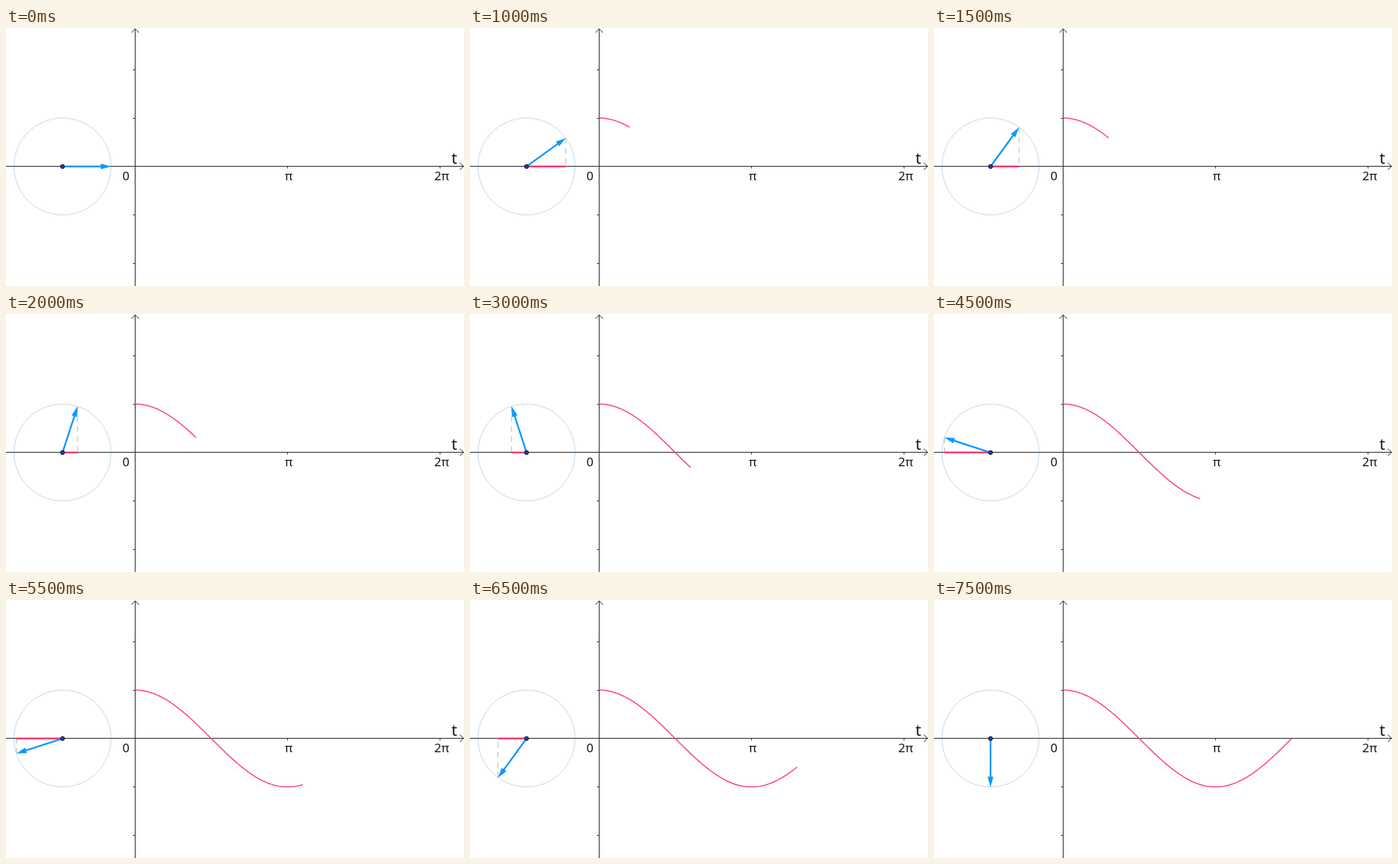
An HTML page for the animation above (8 s loop, 640x361 px).

```html
<!DOCTYPE html>
<html lang="en">
<head>
<meta charset="utf-8">
<title>Cosine from a rotating vector</title>
<style>
  html, body { margin: 0; width: 100%; height: 100%; overflow: hidden; background: #fff; }
  svg { display: block; width: 640px; height: 361px; }
  path, line, circle { fill: none; }
  text { font: 17px "Noto Sans", "Open Sans", sans-serif; fill: #111; }
  .axis { stroke: #222; stroke-width: 1; }
</style>
</head>
<body>
<svg viewBox="0 0 640 361">
  <circle cx="79" cy="193.8" r="67.8" stroke="#bfd9ec"/>
  <path class="axis" d="M0 193.5H639M634 188.5L639.5 193.5L634 198.5
    M180.5 361V1.5M175.5 6.5L180.5 1L185.5 6.5"/>
  <path class="axis" id="ticks"/>
  <text x="162.7" y="213">0</text>
  <text x="389.5" y="213">π</text>
  <text x="598.5" y="213">2π</text>
  <text x="622.5" y="190" style="font-size:22px">t</text>
  <path id="curve" stroke="#ff4070" stroke-width="1.5"/>
  <path id="drop" stroke="#b5b5b5" stroke-dasharray="8 6"/>
  <path id="shadow" stroke="#f5386b" stroke-width="2.4"/>
  <g id="vector">
    <path d="M0 0H56" stroke="#0d99ff" stroke-width="2.4"/>
    <path d="M67.8 0L53.5 -4V4Z" style="fill:#0d99ff"/>
  </g>
  <circle cx="79" cy="193.8" r="2.8" stroke="#0a1030" style="fill:#1c3fc4"/>
</svg>
<script>
  const UNIT = 67.8, CENTER = 79, ORIGIN = 180.3, AXIS = 193.8;
  const STEP_MS = 500, STEPS = 16;
  const $ = id => document.getElementById(id);
  const setPath = (id, d) => $(id).setAttribute("d", d);

  const verticalTicks = [-2, -1, 1, 2]
    .map(n => `M177.5 ${Math.floor(AXIS + n * UNIT) + 0.5}H180.5`);
  const horizontalTicks = [1, 2]
    .map(n => `M${Math.floor(ORIGIN + n * Math.PI * UNIT) + 0.5} 193.5V196.5`);
  setPath("ticks", verticalTicks.concat(horizontalTicks).join(""));

  function cosinePath(end) {
    const points = [];
    const count = Math.ceil(end * 40);
    for (let i = 0; i <= count; i++) {
      const t = end * i / count;
      points.push(`${(ORIGIN + t * UNIT).toFixed(2)} ${(AXIS - Math.cos(t) * UNIT).toFixed(2)}`);
    }
    return "M" + points.join("L");
  }

  function draw(step) {
    const angle = step * Math.PI / 10;
    const x = CENTER + Math.cos(angle) * UNIT;
    const y = AXIS - Math.sin(angle) * UNIT;
    $("vector").setAttribute("transform",
      `translate(${CENTER} ${AXIS}) rotate(${-step * 18})`);
    setPath("drop", step ? `M${x} ${y}V${AXIS}` : "");
    setPath("shadow", step ? `M${CENTER} ${AXIS}H${x}` : "");
    setPath("curve", step ? cosinePath(angle) : "");
  }

  const start = performance.now();
  let shown = -1;
  function tick() {
    const step = Math.floor((performance.now() - start) / STEP_MS) % STEPS;
    if (step !== shown) draw(shown = step);
    requestAnimationFrame(tick);
  }
  tick();
</script>
</body>
</html>
```
